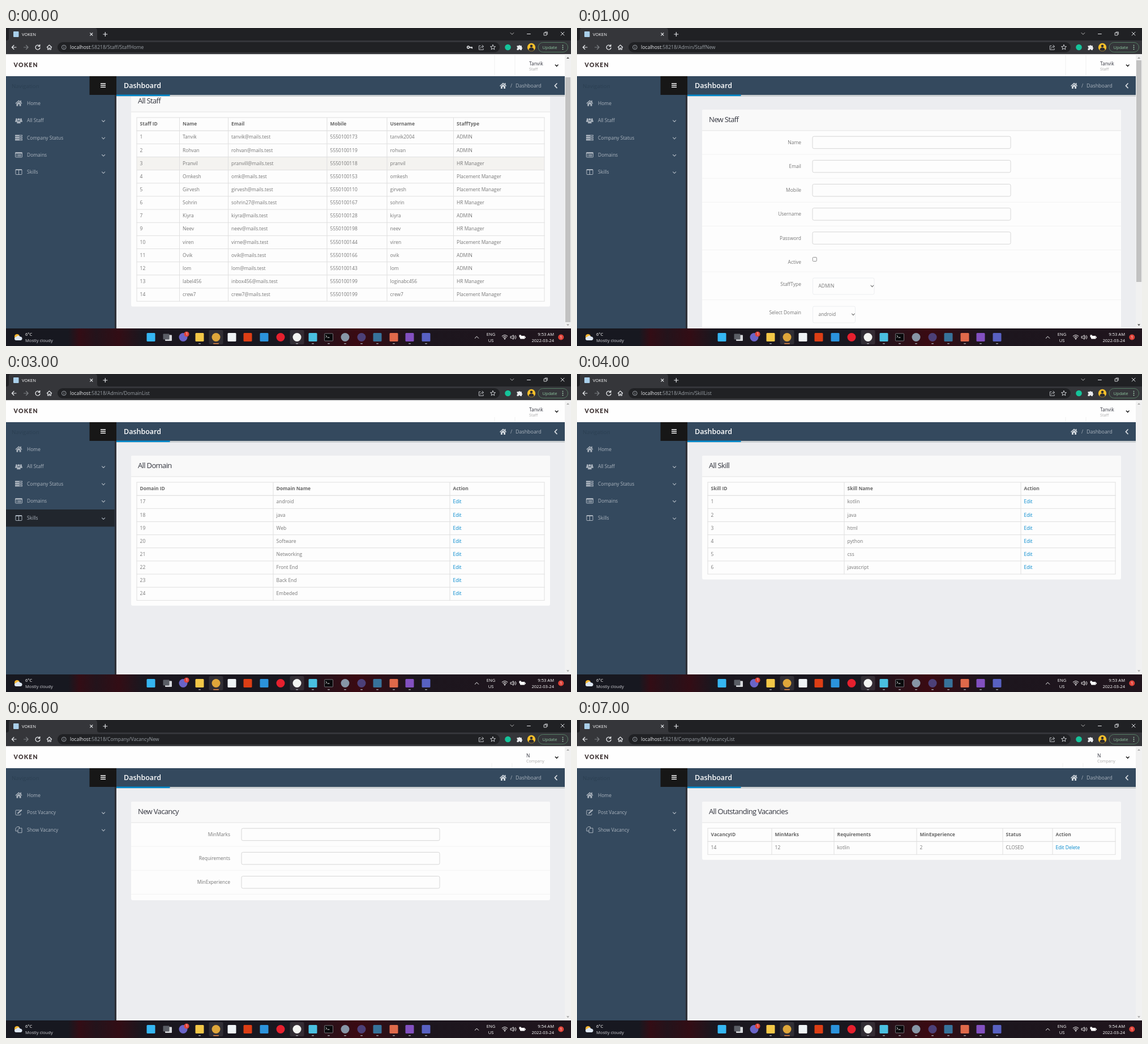
These frames come from a looping animation (998x561 px, 8000 ms). An HTML page:

```html
<!DOCTYPE html>
<html lang="en">
<head>
<title>Staff dashboard</title>
<style>
html, body { margin: 0; width: 100%; height: 100%; overflow: hidden; background: #202124; }
svg { display: block; width: 998px; height: 561px; }
text { font: 8.45px "Open Sans", sans-serif; fill: #777; white-space: pre; }
.b { font-weight: 700; fill: #666; }
.title { font-size: 13px; letter-spacing: -.65px; fill: #33353f; }
.link { fill: #0088cc; }
.nav { fill: #abb4be; }
.ui { font-size: 7.6px; fill: #fff; }
.url { font-size: 8.6px; fill: #9aa0a6; }
.url tspan { fill: #e8eaed; }
.end { text-anchor: end; }
.mid { text-anchor: middle; }
.ln { fill: none; stroke: currentColor; stroke-linecap: round; stroke-linejoin: round; }
.scene { visibility: hidden; animation: show 8s step-end infinite; }
@keyframes show { 0% { visibility: visible; } 12.5%, 100% { visibility: hidden; } }
</style>
</head>
<body>
<svg id="stage" viewBox="0 0 998 561" xmlns="http://www.w3.org/2000/svg"></svg>
<script>
const text = (x, y, s, cls = '', extra = '') => `<text x="${x}" y="${y}" class="${cls}" ${extra}>${s}</text>`;
const rect = (x, y, w, h, fill, r = 0, extra = '') =>
  `<rect x="${x}" y="${y}" width="${w}" height="${h}" fill="${fill}" rx="${r}" ${extra}/>`;
const circle = (x, y, r, fill, extra = '') => `<circle cx="${x}" cy="${y}" r="${r}" fill="${fill}" ${extra}/>`;
const line = (d, color, w = 1) => `<path class="ln" d="${d}" style="color:${color}" stroke-width="${w}"/>`;
const shape = (d, fill) => `<path d="${d}" fill="${fill}"/>`;
const at = (x, y, body) => `<g transform="translate(${x} ${y})">${body}</g>`;
const each = (list, fn) => list.map(fn).join('');

const NAVY = '#34495e', BLUE = '#0088cc', NAV = '#abb4be', LIGHT = '#e8eaed';
const RULE = '#e0e0e0', FAINT = '#f3f3f3';
const ROW = 23.15;

const house = fill => shape('M-6 0L0-5.5 2.8-3V-5H4.4V-1.5L6 0 5 1 0-3.5-5 1Z M-4 1L0-2.5 4 1V5H1.2V1.8H-1.2V5H-4Z', fill);
const person = (x, y, s) => circle(x, y - 2.3 * s, 1.9 * s, NAV) + shape(`M${x - 3 * s} ${y + 4 * s}q0-4 ${3 * s}-4t${3 * s} 4Z`, NAV);
const icons = {
  home: house(NAV),
  users: person(-4, -.5, .8) + person(4, -.5, .8) + person(0, .8, 1.1),
  tasks: each([-5, -1.4, 2.2], y => rect(-6.5, y, 13, 2.8, NAV, .5) + rect(1, y + .9, 4.5, 1, NAVY)),
  list: rect(-6, -4.2, 12, 8.6, 'none', 1, `stroke="${NAV}"`) + rect(-6, -4.4, 12, 2.4, NAV) +
    each([-.6, 1.5], y => rect(-4.4, y, 1.4, 1.2, NAV) + rect(-2, y, 6.4, 1.2, NAV)),
  columns: rect(-5.5, -4.5, 11, 9, 'none', .8, `stroke="${NAV}"`) + rect(-5.5, -4.8, 11, 1.8, NAV) + rect(-.5, -4, 1, 8, NAV),
  edit: line('M2-4H-4.5Q-5.5-4-5.5-3V3.6Q-5.5 4.6-4.5 4.6H2.5Q3.5 4.6 3.5 3.6V2', NAV) + line('M-1.4 1.4L4.6-4', NAV, 2.2),
  copy: line('M-1.5 2.5H-5.5V-2.5L-3-5H1V-2 M-1.5 5V0L1-2.5H5.5V5Z', NAV),
};

const STAFF_MENU = [['home', 'Home'], ['users', 'All Staff'], ['tasks', 'Company Status'], ['list', 'Domains'], ['columns', 'Skills']];
const COMPANY_MENU = [['home', 'Home'], ['edit', 'Post Vacancy'], ['copy', 'Show Vacancy']];

function sidebar(menu, active) {
  return rect(0, 85, 192, 445, NAVY) + rect(191.75, 85, 3.25, 445, '#2f3139') +
    text(10, 106, 'Navigation', '', 'style="font-size:9.75px;fill:#2c4053"') +
    each(menu, ([icon, label], i) => {
      const y = 132.8 + i * 30.3;
      return (i === active ? rect(0, y - 15, 191.75, 30.3, '#21262d') : '') + at(22.5, y, icons[icon]) +
        text(37, y + 3.1, label, 'nav') + (i ? line(`M169.5 ${y - .2}l2.6 2.6 2.6-2.6`, NAV, 1.1) : '');
    });
}

function topBar(company, full) {
  const x = company ? 919 : 924;
  return rect(0, 46, 987, 39, '#fefefe') + rect(0, 46, 987, 1.95, '#ededed') +
    text(13.5, 69.4, 'VOKEN', '', 'style="font:900 10.5px Lato,sans-serif;letter-spacing:1.2px;fill:#443939"') +
    each([x - 61.5, x - 25.5], sx => rect(sx, full ? 48 : 76, 1, full ? 37 : 9, '#f0f0f0')) +
    text(x, 66, company ? 'N' : 'Tanvik', '', 'style="fill:#33353f"') +
    text(x, 74.6, company ? 'Company' : 'Staff', '', 'style="font-size:7.15px;fill:#acacac"') +
    line('M970.3 65l2.4 2.4 2.4-2.4', '#222', 1.5);
}

function pageBar() {
  return rect(195, 85, 792, 33, NAVY) + rect(195, 118, 792, 3, '#cbcfd1') + rect(195, 117.5, 94.5, 2.6, BLUE) +
    rect(147.5, 85, 47.5, 33, '#171717') + each([97.4, 100.5, 103.6], y => rect(167, y, 9, 1.5, '#fff')) +
    text(208, 106.2, 'Dashboard', '', 'style="font-size:12.5px;font-weight:600;fill:#fff"') +
    at(878, 102, house('#d4dae0')) + text(891, 105, '/', 'nav') +
    text(900, 105, 'Dashboard', 'nav', 'style="font-size:8.9px"') + line('M973 98l-3.6 3.8 3.6 3.8', '#d8dde2', 1.7);
}

const TRACK = [57, 519];
function scrollbar([top, bottom] = TRACK) {
  const arrow = free => free ? '#505050' : '#a3a3a3';
  const [first, last] = TRACK;
  const whole = top === first && bottom === last;
  return rect(987, 46, 11, 484, '#f1f1f1') + (whole ? '' : rect(988, top, 9, bottom - top, '#c1c1c1')) +
    shape('M990 54h5l-2.5-2.8Z', arrow(top > first)) + shape('M990 522.6h5l-2.5 2.8Z', arrow(bottom < last));
}

function panel(title, bottom) {
  return rect(221, 144, 740, bottom - 144, '#fdfdfd', 3) + rect(221, 144, 740, 37, '#f9f9f9', 3) +
    rect(221, 180.5, 740, 1, '#e4e4e4') + text(233, 166.3, title, 'title');
}

function table(title, cols, heads, rows, hover = -1) {
  const h = ROW * (rows.length + 1), top = 191;
  const bottom = top + h;
  const cells = (row, y, cls) => each(row, (s, c) => text(cols[c] + 5.6, y, s, s.startsWith('Edit') ? 'link' : cls));
  return panel(title, bottom + 9.5) +
    (hover < 0 ? '' : rect(231, top + ROW * (hover + 1), 720, ROW, '#f4f3f0')) +
    each([0, ...rows.map((_, i) => i + 1), rows.length + 1], i => rect(230.5, top - .5 + i * ROW, 721, i === 1 ? 1.3 : 1, RULE)) +
    each([...cols, 951], x => rect(x - .5, top, 1, h, RULE)) +
    cells(heads, 205.2, 'b') + each(rows, (row, i) => cells(row, 228.4 + i * ROW, ''));
}

const label = (y, s) => text(396, y, s, 'end');
const input = y => rect(416, y, 350, 21.5, '#fdfdfd', 2.5, 'stroke="#d6d6d6"');
const select = (y, w, s) => rect(416.5, y, w, 29, '#fdfdfd', 2.5, 'stroke="#eceef0"') + text(426.5, y + 17.4, s) +
  line(`M${410.5 + w} ${y + 13}l2.4 2.6 2.4-2.6`, '#666', 1.1);
const fields = names => each(names, (s, i) => {
  const y = 191.2 + i * 42.15;
  return label(y + 13.8, s) + input(y) + rect(221, y + 31.3, 740, 1, FAINT);
});

function staffForm() {
  return panel('New Staff', 540) + fields(['Name', 'Email', 'Mobile', 'Username', 'Password']) +
    label(416, 'Active') + rect(416.3, 404.5, 7, 7, '#fff', 1.3, 'stroke="#868686" stroke-width=".9"') +
    rect(221, 429.5, 740, 1, FAINT) + label(455, 'StaffType') + select(441, 108.5, 'ADMIN') +
    rect(221, 479, 740, 1, FAINT) + label(505, 'Select Domain') + select(491, 75, 'android');
}

function profile() {
  const bold = 'style="font-size:11.7px;font-weight:600;fill:#6d6d6d"';
  return rect(221, 186.5, 676.5, 126, '#fdfdfd', 3) + rect(231, 171, 57.5, 38.5, '#383032') +
    text(237.5, 188, 'N /&gt;', '', 'style="font-size:11.7px;font-weight:700;fill:#fff;letter-spacing:-.3px"') +
    rect(236.5, 196, 46.5, 17, BLUE, 1) + text(242, 207.2, 'Company', '', 'style="font-size:7.9px;fill:#fff"') +
    each(['N', 'E@mails.test', '5550100153', ''], (s, i) =>
      circle(231, 227.6 + i * 14.4, 2, 'none', 'stroke="#888" stroke-width=".9"') + text(253, 231.8 + i * 14.4, s, '', bold)) +
    each([287, 295], y => rect(231, y, 657, 1, FAINT));
}

const KINDS = { A: 'ADMIN', H: 'HR Manager', P: 'Placement Manager' };
const people = [
  [1, 'Tanvik', 'tanvik', '5550100173', 'tanvik2004', 'A'], [2, 'Rohvan', 'rohvan', '5550100119', 'rohvan', 'A'],
  [3, 'Pranvil', 'pranvill', '5550100118', 'pranvil', 'H'], [4, 'Omkesh', 'omk', '5550100153', 'omkesh', 'P'],
  [5, 'Girvesh', 'girvesh', '5550100110', 'girvesh', 'P'], [6, 'Sohrin', 'sohrin27', '5550100167', 'sohrin', 'H'],
  [7, 'Kiyra', 'kiyra', '5550100128', 'kiyra', 'A'], [9, 'Neev', 'neev', '5550100198', 'neev', 'H'],
  [10, 'viren', 'virne', '5550100144', 'viren', 'P'], [11, 'Ovik', 'ovik', '5550100166', 'ovik', 'A'],
  [12, 'lom', 'lom', '5550100143', 'lom', 'A'], [13, 'label456', 'inbox456', '5550100199', 'loginabc456', 'H'],
  [14, 'crew7', 'crew7', '5550100199', 'crew7', 'P'],
].map(([id, name, mail, phone, login, kind]) => [`${id}`, name, `${mail}@mails.test`, phone, login, KINDS[kind]]);

const domains = ['android', 'java', 'Web', 'Software', 'Networking', 'Front End', 'Back End', 'Embeded'];
const skills = ['kotlin', 'java', 'html', 'python', 'css', 'javascript'];

const scenes = [
  { url: 'Staff/StaffHome', key: true, full: true, scroll: 33, thumb: [87, 519],
    body: table('All Staff', [231, 306.5, 392.5, 567, 673, 790.5],
      ['Staff ID', 'Name', 'Email', 'Mobile', 'Username', 'StaffType'], people, 2) },
  { url: 'Admin/StaffNew', full: true, thumb: [57, 448], body: staffForm() },
  { url: 'Admin/CompanyListPending', active: 3,
    body: table('CompanyList', [231, 422, 543, 683, 816], ['Username', 'Email', 'Mobile', 'Status', 'Action'], []) },
  { url: 'Admin/DomainList', active: 4,
    body: table('All Domain', [231, 472, 784], ['Domain ID', 'Domain Name', 'Action'],
      domains.map((s, i) => [`${17 + i}`, s, 'Edit'])) },
  { url: 'Admin/SkillList',
    body: table('All Skill', [231, 472, 784], ['Skill ID', 'Skill Name', 'Action'],
      skills.map((s, i) => [`${i + 1}`, s, 'Edit'])) },
  { url: 'Company/CompanyHome', company: true, key: true, full: true, thumb: [57, 425], body: profile() },
  { url: 'Company/VacancyNew', company: true,
    body: panel('New Vacancy', 318) + fields(['MinMarks', 'Requirements', 'MinExperience']) },
  { url: 'Company/MyVacancyList', company: true,
    body: table('All Outstanding Vacancies', [231, 344, 454, 600, 752, 840],
      ['VacancyID', 'MinMarks', 'Requirements', 'MinExperience', 'Status', 'Action'],
      [['14', '12', 'kotlin', '2', 'CLOSED', 'Edit Delete']]) },
];

function scene(s, i) {
  return `<g class="scene" style="animation-delay:${i - 8}s">` +
    rect(195, 121, 792, 409, '#ecedf0') + `<g clip-path="url(#page)">${at(0, -(s.scroll || 0), s.body)}</g>` +
    sidebar(s.company ? COMPANY_MENU : STAFF_MENU, s.active) + topBar(s.company, s.full) + pageBar() + scrollbar(s.thumb) +
    text(113, 37.2, `<tspan>localhost</tspan>:58218/${s.url}`, 'url') +
    (s.key ? circle(816.5, 34, 1.9, 'none', `stroke="${LIGHT}" stroke-width="1.5"`) + line('M818.8 34H823.4V36 M821.3 34V35.4', LIGHT, 1.4) : '') +
    text(968, 543, i < 5 ? '9:53 AM' : '9:54 AM', 'ui end') + '</g>';
}

function browser() {
  return rect(0, 0, 998, 46, '#202124') + shape('M1 22Q5 22 5 18V5Q5 0 9 0H157Q161 0 161 5V18Q161 22 165 22Z', '#35363a') +
    rect(0, 22, 998, 24, '#35363a') + rect(91, 25, 781, 18, '#202124', 9) +
    rect(13, 6, 9.5, 10, '#a9cfea', 1) + text(28, 13.5, 'VOKEN', 'ui') +
    line('M148.7 8.9l4.2 4.2m0-4.2l-4.2 4.2 M171.8 11h7m-3.5-3.5v7', LIGHT, 1.2) +
    line('M18 34H10.5m3.4-3.5L10.4 34l3.5 3.5', LIGHT, 1.2) + line('M31.5 34H39m-3.4-3.5L39.1 34l-3.5 3.5', '#7d8084', 1.2) +
    line('M59.2 31.6A4 4 0 1 0 60 35 M59.8 29.4V32.4H56.8', LIGHT, 1.3) +
    line('M72.3 34l4.2-4 4.2 4M73.6 33.4V38h2v-2.8h1.8V38h2V33.4', LIGHT, 1.1) +
    circle(102.3, 34, 3.8, 'none', 'stroke="#9aa0a6"') + rect(101.8, 33.5, 1, 2.7, '#9aa0a6') + rect(101.8, 31.8, 1, 1, '#9aa0a6') +
    line('M838 31.3H835.4V38.3H843.2V36.4 M837.7 36Q838 32.7 842.4 32.6M841 30.2l2.8 2.4-2.8 2.4', '#b9bcc0') +
    line('M860 29.6l1.3 3 3.2.2-2.5 2 .9 3.2-2.9-1.8-2.9 1.8.9-3.2-2.5-2 3.2-.2Z', '#c9ccd0') +
    circle(886.5, 34, 5.3, '#15c39a') +
    shape('M902.5 31.2H905.5A1.6 1.6 0 0 1 908.5 31.2H911V34A1.6 1.6 0 0 1 911 37V39H908.4A1.5 1.5 0 0 0 905.4 39H902.5V36.3A1.5 1.5 0 0 0 902.5 33.4Z', LIGHT) +
    circle(928, 34, 7.2, '#f4bf2a') + circle(928, 31.7, 2.3, '#2b2a30') + shape('M923.4 39q0-4.6 4.6-4.6t4.6 4.6q-4.6 3.4-9.2 0Z', '#2b2a30') +
    rect(940, 25.5, 52.5, 17, 'none', 8.5, 'stroke="#557c63"') + text(947.5, 36.8, 'Update', 'ui', 'style="fill:#8fc7a0"') +
    each([30.6, 34, 37.4], y => circle(983.5, y, .9, '#a9d8b6')) +
    line('M891 8.5l2.9 2.9 2.9-2.9', '#bbb') + line('M920.5 10.5h5.8', LIGHT) +
    line('M950.5 8.5h4.3v4.4h-4.3ZM952 7h4.3v4.4', LIGHT, .9) + line('M980.2 7.2l5.8 5.8m0-5.8l-5.8 5.8', LIGHT);
}

function taskbar() {
  // [x, round, color]
  const apps = [[256, 0, '#35b6f2'], [313, 1, '#6a64c8'], [342, 0, '#f3c747'], [371, 1, '#dfa63a'], [399, 0, '#eef2f5'],
    [427, 0, '#dc3e15'], [456, 0, '#2b93dc'], [485, 1, '#e5202e'], [514, 1, '#f3f5f2'], [542, 0, '#49bfe0'],
    [599, 1, '#8796a6'], [628, 1, '#4c4078'], [656, 0, '#37729a'], [685, 0, '#e0694a'], [713, 0, '#8250c0'], [742, 0, '#5861c2']];
  const running = [342, 514, 542, 570, 599, 628, 656, 685, 713, 742];
  return rect(0, 530, 998, 31, '#171820') + rect(0, 530, 998, 31, 'url(#glow)') +
    each([371, 514], x => rect(x - 12.5, 533, 25, 25, '#fff', 2.5, 'opacity=".1"')) +
    circle(19.5, 544.5, 4.5, '#f6b732') + shape('M18 551a3 3 0 0 1 0-6a4 4 0 0 1 7-.5a3.3 3.3 0 0 1 1 6.5Z', '#dce6f2') +
    text(34, 543, '6&deg;C', 'ui') + text(34, 553.5, 'Mostly cloudy', 'ui', 'style="fill:#d0d1d6"') +
    each(apps, ([x, round, color]) => round ? circle(x, 545.5, 7.5, color) : rect(x - 7.5, 538, 15, 15, color, 1.5)) +
    rect(281, 541.5, 12, 10.5, '#d6d8dc', 1) + rect(277.5, 539.5, 11, 10, '#5b5e66', 1) +
    rect(562.5, 539, 15, 13, '#08090b', 1, 'stroke="#8b8d92" stroke-width=".8"') + line('M565 542.5l1.8 1.6-1.8 1.6M568 546h3', '#fff', .9) +
    circle(319, 540, 4.6, '#e0443a') + text(319, 542.4, '1', 'ui mid', 'style="font-size:6.5px"') +
    each(running, x => rect(x - 2, 556, 4, 1.5, '#9a9ca3', .7)) + rect(366, 556, 10, 1.5, '#e58a4c', .7) +
    line('M828.3 547.3l3.2-3.2 3.2 3.2', '#fff') + text(856.5, 543, 'ENG', 'ui mid') + text(856.5, 553.5, 'US', 'ui mid') +
    line('M876.2 543.6q4.8-4 9.6 0M877.8 545.5q3.2-2.6 6.4 0M879.4 547.3q1.6-1.2 3.2 0', '#fff') + circle(881, 548.8, .9, '#fff') +
    line('M891.5 544h2l2.6-2.3v7.6l-2.6-2.3h-2ZM897.8 543.6q1.6 1.9 0 3.8M899.6 542.3q2.8 3.2 0 6.4', '#fff', .9) +
    rect(908, 543, 8.5, 5.6, '#fff', 1) + rect(917, 544.6, 1, 2.4, '#fff') + shape('M906.5 541.5h3.5v3.5l-1.8 1.5-1.7-1.5Z', '#fff') +
    text(968, 553.5, '2022-03-24', 'ui end') +
    circle(980.3, 545.5, 5, '#e0443a') + text(980.3, 548, '1', 'ui mid', 'style="font-size:7px"');
}

const glow = [[0, 0], [.11, 0], [.13, .8], [.16, .35], [.2, .8], [.24, .1], [.5, .05], [.58, .6], [.62, 1], [.67, .6], [.72, .15], [1, .25]];
document.getElementById('stage').innerHTML =
  `<defs><clipPath id="page"><rect x="195" y="121" width="792" height="409"/></clipPath><linearGradient id="glow">` +
  each(glow, ([o, a]) => `<stop offset="${o}" stop-color="#3a0a12" stop-opacity="${a}"/>`) + '</linearGradient></defs>' +
  browser() + taskbar() + each(scenes, scene);
</script>
</body>
</html>
```
